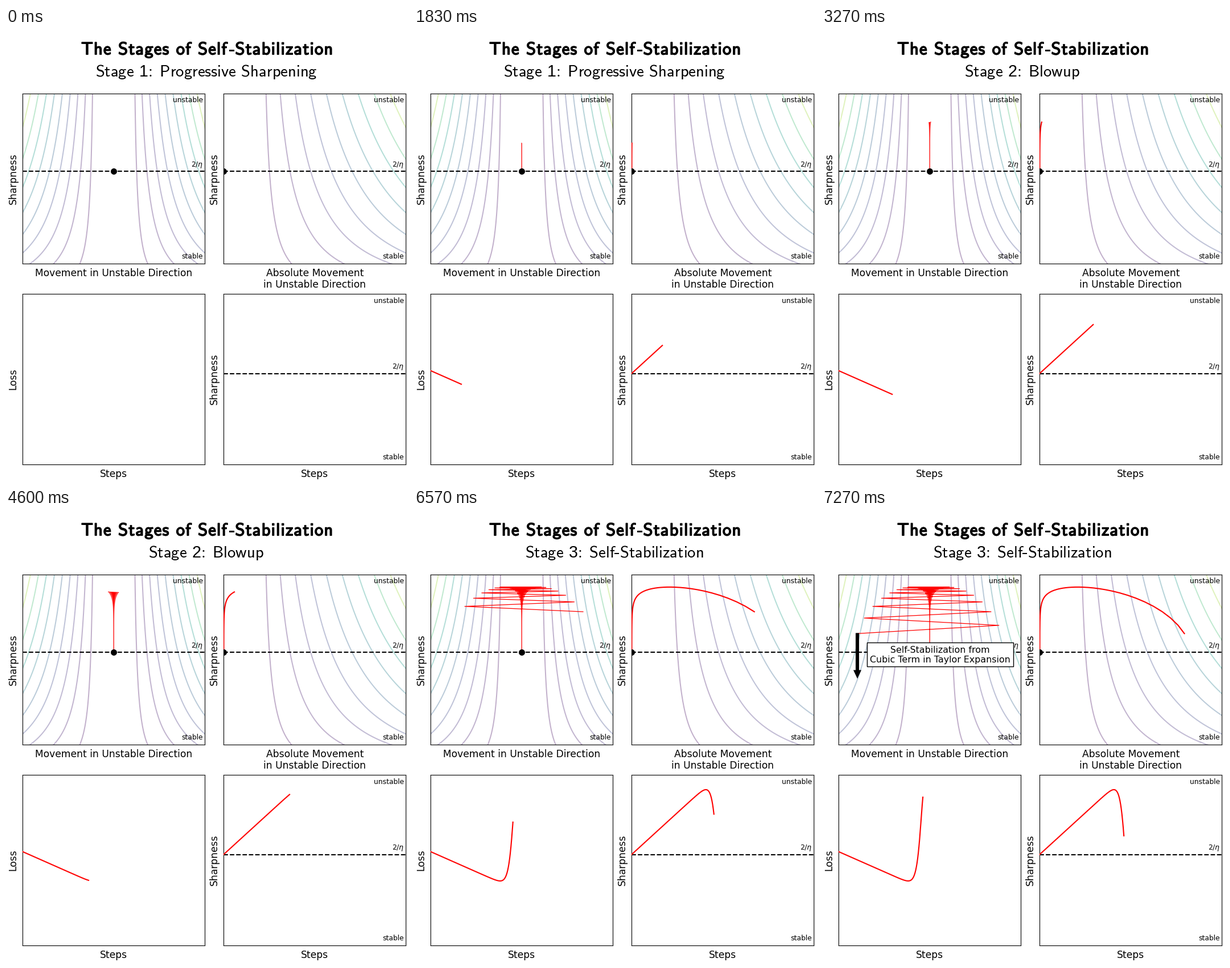
Write a matplotlib script that moves like this. It is 706 by 794 pixels and loops after 8 s.

```python
import math

import numpy as np
import matplotlib.pyplot as plt
from matplotlib.animation import FuncAnimation
from matplotlib.patches import Polygon, Rectangle
from matplotlib.patheffects import withStroke

W, H, DPI = 706, 794, 64
PX = 72 / DPI  # points per pixel
PANEL_W, PANEL_H = 320, 298.6
LEFT, RIGHT, TOP, BOTTOM = 29.2, 382.2, 114.6, 466
EDGE_TOP, EDGE_LOW = 251.4, 605.55  # where sharpness equals 2/eta
STEPS_SHOWN = 279
LAST_STEP = 129
LINE = 2.1 * PX
INTERVAL, FRAMES = 40, 200

plt.rcParams["font.family"] = "DejaVu Sans"
fig = plt.figure(figsize=(W / DPI, H / DPI), dpi=DPI, facecolor="white")


def panel(x, y, xlim, zero):
    """Axes in pixel units, with y = 0 at the pixel row `zero`."""
    ax = fig.add_axes([x / W, 1 - (y + PANEL_H) / H, PANEL_W / W, PANEL_H / H])
    ax.set(xlim=xlim, ylim=(zero - y - PANEL_H, zero - y), xticks=[], yticks=[])
    for spine in ax.spines.values():
        spine.set_linewidth(1.12 * PX)
    return ax


def label(x, y, text, size=17.08, ha="center", **kw):
    return fig.text(x / W, 1 - y / H, text, fontsize=size * PX, ha=ha,
                    va="baseline", **kw)


def box(x0, y0, x1, y1, **kw):
    patch = Rectangle((x0 / W, 1 - y1 / H), (x1 - x0) / W, (y1 - y0) / H,
                      transform=fig.transFigure, **kw)
    return fig.add_artist(patch)


# Mathtext has no sans digits or hyphen; a hyphen leaves a gap for a bar
MARKUP = {" ": r"\hspace{0.38}", "-": r"\hspace{0.38}",
          ":": r"\hspace{-0.2}:\hspace{-0.08}"}
MARKUP.update({d: r"\mathregular{%s}" % d for d in "123"})


def heading(x, y, text, size, ha="center", bold=False):
    joiner = r"\hspace{0.045}" if bold else ""
    body = joiner.join(MARKUP.get(c, c) for c in text)
    art = label(x, y, r"$\mathsf{" + body + "}$", size, ha,
                math_fontfamily="cm", fontfamily="Liberation Sans")
    if bold:
        art.set_path_effects([withStroke(linewidth=1.6 * PX,
                                         foreground="black")])
    return art


def simulate():
    """Oscillation x and sharpness y under gradient descent past 2/eta."""
    x, y = [0.0706], [0.0]
    for _ in range(LAST_STEP):
        x_now, y_now = x[-1], y[-1]
        x.append(-(1 + 0.00095 * y_now) * x_now)
        y.append(y_now + 1.054 - 0.001045 * x_now ** 2)
    return np.array(x), np.array(y)


steps = np.arange(LAST_STEP + 1)
swing, sharpness = simulate()
loss = 0.00995 * swing ** 2 - 0.506 * steps

ax_move = panel(LEFT, TOP, (-PANEL_W / 2, PANEL_W / 2), EDGE_TOP)
ax_abs = panel(RIGHT, TOP, (0, PANEL_W), EDGE_TOP)
ax_loss = panel(LEFT, BOTTOM, (0, STEPS_SHOWN), 600.6)
ax_sharp = panel(RIGHT, BOTTOM, (0, STEPS_SHOWN), EDGE_LOW)

# Level curves of x^2 (y + 211) - 4123 y
heights = np.linspace(-163, 138, 200)
for n in range(9):
    level = 0.2825 * (n + 2.155) ** 2 + 0.055
    reach = np.sqrt((level * 1e6 + 4123 * heights) / (heights + 211))
    style = dict(color=plt.cm.viridis(level / 34), alpha=0.33, lw=2 * PX,
                 zorder=1)
    ax_abs.plot(reach, heights, **style)
    for side in (-0.5, 0.5):
        ax_move.plot(side * reach, heights, **style)

for ax in (ax_move, ax_abs, ax_sharp):
    ax.axhline(0, color="black", ls="--", lw=LINE, zorder=2)
for ax in (ax_move, ax_abs):
    ax.plot(0, 0, "o", color="black", ms=10 * PX, zorder=4)

for left, top, edge in ((LEFT, TOP, EDGE_TOP), (RIGHT, TOP, EDGE_TOP),
                        (RIGHT, BOTTOM, EDGE_LOW)):
    right = left + PANEL_W - 3
    label(right, top + 15.6, "unstable", 12.3, "right")
    label(right, top + PANEL_H - 8.8, "stable", 12.3, "right")
    label(right, edge - 8.5, r"$2/\eta$", 12.3, "right")

mid_left, mid_right = LEFT + PANEL_W / 2, RIGHT + PANEL_W / 2
label(mid_left, 435.4, "Movement in Unstable Direction")
label(mid_right, 435.4, "Absolute Movement")
label(mid_right, 455, "in Unstable Direction")
for x in (mid_left, mid_right):
    label(x, 787, "Steps")
for left, top, text in ((LEFT, TOP, "Sharpness"), (RIGHT, TOP, "Sharpness"),
                        (LEFT, BOTTOM, "Loss"), (RIGHT, BOTTOM, "Sharpness")):
    label(left - 11.5, top + PANEL_H / 2, text, rotation=90,
          rotation_mode="anchor")

heading(391, 46.4, "The Stages of Self", 30.5, "right", bold=True)
box(392, 38, 401, 41, color="black", lw=0)
heading(402.5, 46.4, "Stabilization", 30.5, "left", bold=True)

subtitles = [
    [heading(352, 84.6, "Stage 1: Progressive Sharpening", 28.6)],
    [heading(351.5, 84.6, "Stage 2: Blowup", 28.6)],
    [heading(351.5, 84.6, "Stage 3: Self-Stabilization", 28.6),
     box(352, 77, 360, 79, color="black", lw=0)],
]

# The lower sharpness panel has a slightly larger vertical range
curves = [
    (ax_move, swing, sharpness, 1.25 * PX),
    (ax_abs, 2 * np.abs(swing), sharpness, LINE),
    (ax_loss, steps, loss, LINE),
    (ax_sharp, steps, 0.992 * sharpness, LINE),
]
lines = [ax.plot([], [], color="red", lw=lw, zorder=3)[0]
         for ax, _, _, lw in curves]

arrow = ax_move.add_patch(Polygon([(0, 0)] * 3, color="black", lw=0, zorder=5))
callout = [
    box(79.2, 234.3, 335.5, 276.3, fc="white", ec="black", lw=1.4 * PX,
        zorder=4),
    label(207.2, 251.5, "Self-Stabilization from", 15.9, zorder=5),
    label(207.2, 269, "Cubic Term in Taylor Expansion", 15.9, zorder=5),
]


def arrow_shape(progress):
    x, y = swing[-1], sharpness[-1] + 1
    tip = y - 80 * progress
    neck = min(y, tip + 15)
    return [(x - 3, y), (x - 3, neck), (x - 7, neck), (x, tip),
            (x + 7, neck), (x + 3, neck), (x + 3, y)]


def step_at(t):
    # Each stage plays more slowly than the one before
    return math.floor(np.interp(t, [32, 2987, 5903, 6033, 6567, 6867],
                                [0, 78, 120, 121, 126, LAST_STEP]) + 1e-6)


def update(frame):
    t = frame * INTERVAL + 30
    end = step_at(t) + 1
    for line, (_, xs, ys, _) in zip(lines, curves):
        line.set_data(xs[:end], ys[:end])

    stage = (t >= 2987) + (t >= 5967)
    for i, group in enumerate(subtitles):
        for art in group:
            art.set_visible(i == stage)

    grown = min(max(math.floor((t - 6967) / 33.3) + 1, 0), 10)
    for art in callout + [arrow]:
        art.set_visible(grown > 0)
    if grown:
        arrow.set_xy(arrow_shape(grown / 10))
    return lines


anim = FuncAnimation(fig, update, frames=FRAMES, interval=INTERVAL,
                     init_func=lambda: update(0), repeat=True, repeat_delay=0,
                     blit=False)
plt.show()
```
